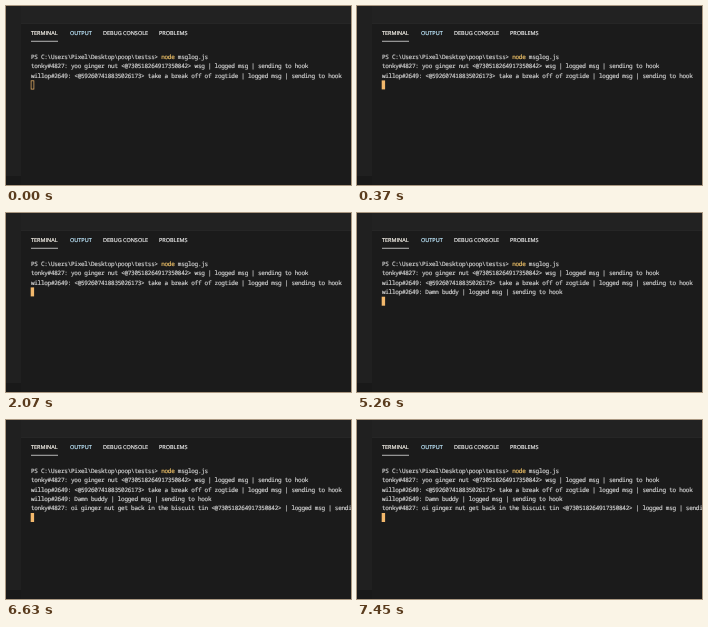
Write an HTML page that moves like this. It is 345x179 px and loops after 8 s.

```html
<!DOCTYPE html>
<html lang="en">
<head>
<meta charset="utf-8">
<title>Terminal log</title>
<style>
  html, body { margin: 0; width: 100%; height: 100%; overflow: hidden; background: #1b1b1b; }
  svg { display: block; width: 100vw; height: 100vh; }
  text { white-space: pre; text-rendering: geometricPrecision; stroke: currentColor; fill: currentColor; }
  .tab { font: 5.5px "Open Sans", "Noto Sans", sans-serif; stroke-width: 0.22; }
  .row { font: 6px "Noto Sans Mono", "DejaVu Sans Mono", monospace; letter-spacing: -0.26px; color: #d0d0d0; stroke-width: 0.18; }
  .cmd { color: #edc068; stroke: currentColor; fill: currentColor; }
</style>
</head>
<body>
<svg viewBox="0 0 345 179" preserveAspectRatio="none">
  <rect width="345" height="179" fill="#1b1b1b"/>
  <rect width="345" height="17" fill="#222222"/>
  <rect width="15" height="170" fill="#202020"/>
  <rect y="170" width="15" height="9" fill="#191919"/>
  <rect x="15" y="17" width="330" height="1" fill="#262626"/>
  <g id="tabs"></g>
  <rect x="25" y="34.8" width="27" height="0.9" fill="#c8c8c8"/>
  <g id="rows"></g>
  <rect id="cursor"/>
</svg>
<script>
const LOOP = 8000, FOCUS = 370, LEFT = 24.9, TOP = 46.5, PITCH = 9.3;
const AMBER = '#f2b86c';
const tail = ' | logged msg | sending to hook';
const anna = 'tonky#4827: ', ben = 'willop#2649: ';
const annaTag = '<@730518264917350842>', benTag = '<@592607418835026173>';

const lines = [
  { at: 0, text: 'PS C:\\Users\\Pixel\\Desktop\\poop\\testss> ', cmd: 'node', rest: ' msglog.js' },
  { at: 0, text: anna + 'yoo ginger nut ' + annaTag + ' wsg' + tail },
  { at: 0, text: ben + benTag + ' take a break off of zogtide' + tail },
  { at: 3200, text: ben + 'Damn buddy' + tail },
  { at: 6630, text: anna + 'oi ginger nut get back in the biscuit tin ' + annaTag + tail }
];

const byId = id => document.getElementById(id);

function add(parent, tag, attrs, text = '') {
  const el = document.createElementNS('http://www.w3.org/2000/svg', tag);
  setAll(el, attrs);
  el.textContent = text;
  parent.appendChild(el);
  return el;
}

function setAll(el, attrs) {
  for (const key in attrs) el.setAttribute(key, attrs[key]);
}

[['TERMINAL', 25, '#f0ece4'], ['OUTPUT', 64, '#b8e0f4'],
 ['DEBUG CONSOLE', 97, '#dedede'], ['PROBLEMS', 153, '#dedede']]
  .forEach(([name, x, color]) =>
    add(byId('tabs'), 'text', { class: 'tab', x, y: 29.3, style: 'color:' + color }, name));

lines.forEach((line, i) => {
  line.el = add(byId('rows'), 'text', { class: 'row', x: LEFT, y: TOP + PITCH * i + 6.5 }, line.text);
  if (line.cmd) {
    add(line.el, 'tspan', { class: 'cmd' }, line.cmd);
    add(line.el, 'tspan', {}, line.rest);
  }
});

function draw(t) {
  let count = 0;
  for (const line of lines) {
    const shown = t >= line.at;
    line.el.style.display = shown ? '' : 'none';
    if (shown) count++;
  }
  const y = TOP + PITCH * count;
  // The cursor is hollow until the terminal gains focus.
  setAll(byId('cursor'), t < FOCUS
    ? { x: 25.1, y: y + 0.4, width: 2.8, height: 8.3, fill: 'none', stroke: AMBER, 'stroke-width': 0.7 }
    : { x: 24.7, y, width: 3.4, height: 9, fill: AMBER, stroke: 'none' });
}

const start = performance.now();
function tick() {
  draw((performance.now() - start) % LOOP);
  requestAnimationFrame(tick);
}
tick();
</script>
</body>
</html>
```
